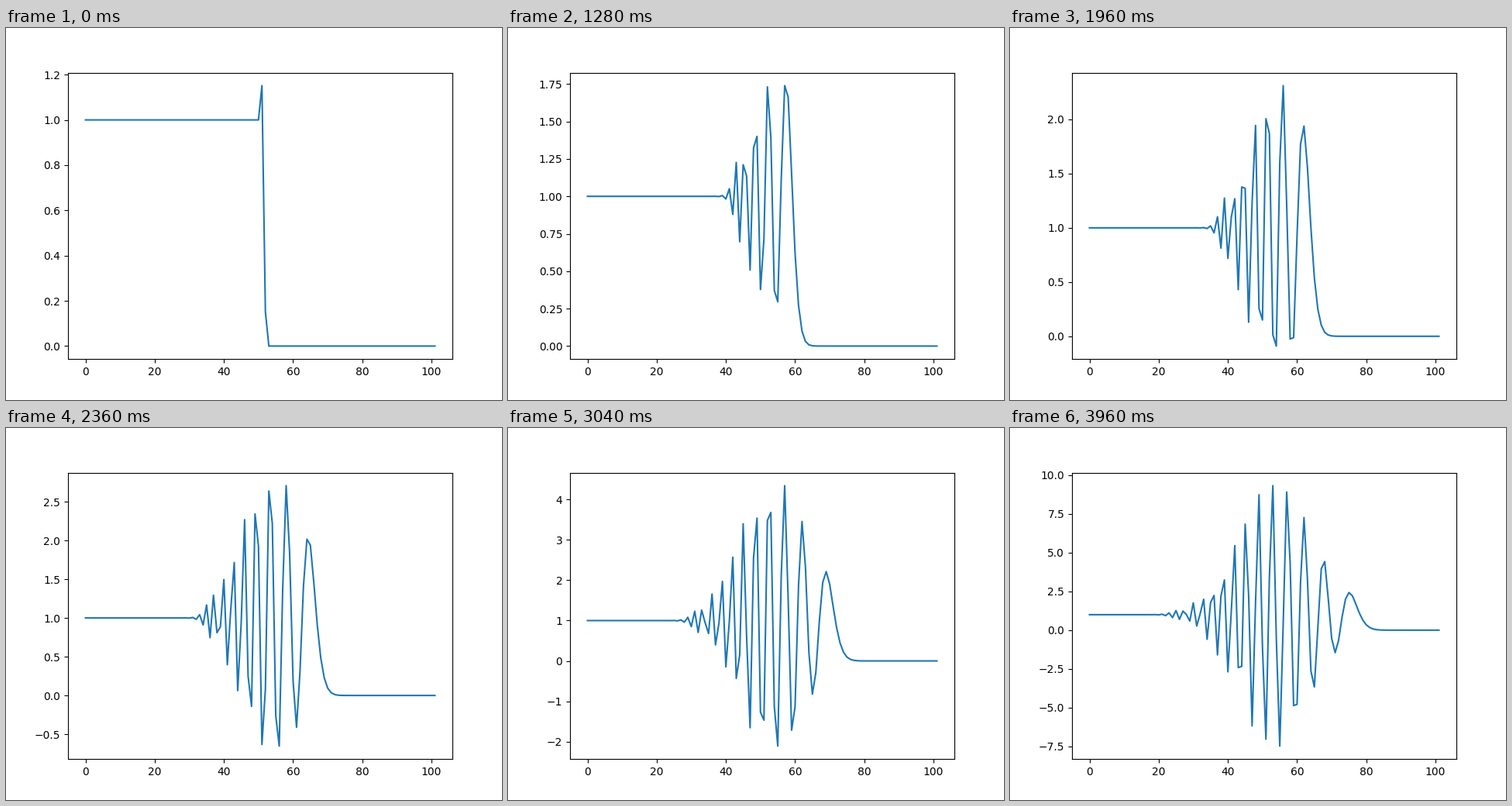
Recreate the animation shown at these times as a matplotlib script. Size 640x480 px, loop 4000 ms.

```python
import numpy as np
import matplotlib.pyplot as plt
from matplotlib.animation import FuncAnimation

POINTS = 102
STEPS = 100
DX = 1 / (POINTS - 1)
DT = 0.003
COURANT = DT / DX


def advance(u):
    """One forward-time, centred-space step of linear advection."""
    new = u.copy()
    new[1:-1] -= COURANT / 2 * (u[2:] - u[:-2])
    return new


def solve():
    u = np.where(np.arange(POINTS) < 52, 1.0, 0.0)
    states = []
    for _ in range(STEPS):
        u = advance(u)
        states.append(u)
    return states


states = solve()
fig, ax = plt.subplots(figsize=(6.4, 4.8), dpi=100)
line, = ax.plot(np.arange(POINTS), states[0], color="tab:blue", lw=1.5)


def draw(step):
    line.set_ydata(states[step])
    ax.relim()
    ax.autoscale_view()
    return line,


def reset():
    return draw(0)


anim = FuncAnimation(fig, draw, frames=STEPS, init_func=reset,
                     interval=40, repeat=True, repeat_delay=0, blit=False)
plt.show()
```
